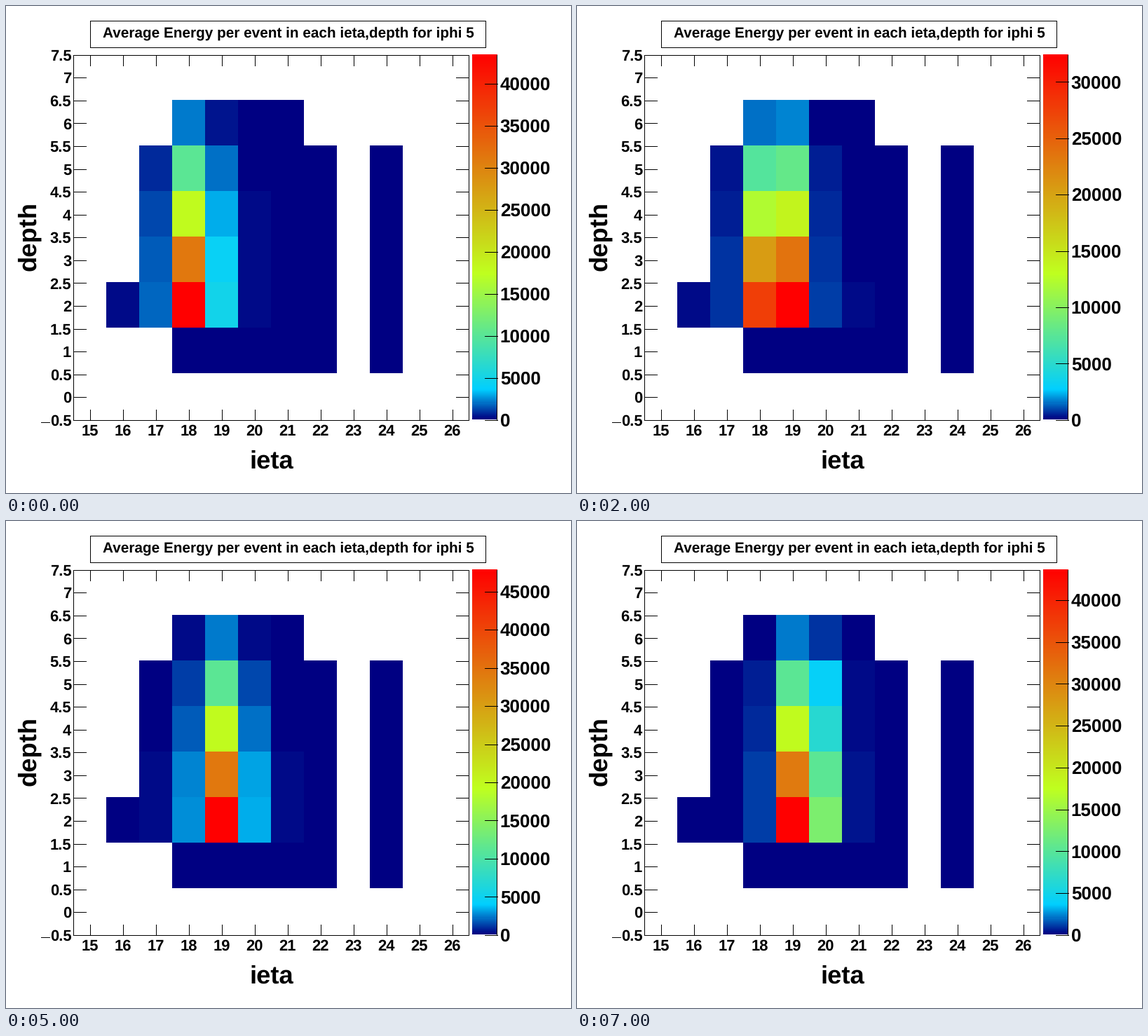
Write a matplotlib script that moves like this. It is 806x695 px and loops after 8 s.

```python
import numpy as np
import matplotlib.pyplot as plt
from matplotlib.animation import FuncAnimation
from matplotlib.colors import LinearSegmentedColormap
from matplotlib.patches import Rectangle

W, H, DPI = 806, 695, 64
PX = 72 / DPI
LEFT, RIGHT, TOP, BOTTOM = 96.5, 660.5, 69.5, 590.5
BAR_L, BAR_R = 665, 701
STEP = 5000
LEVELS = 255
NUDGE = 0.25  # keeps half-pixel coordinates from snapping to the next pixel

IETA = np.arange(15, 27)
DEPTH = np.arange(8)
PROFILE = np.array([0, 0, 1, 0.74, 0.44, 0.26, 0.055, 0])
MAXIMA = [43460, 40430, 32400, 45480, 48300, 47850, 47460, 43600]

plt.rcParams.update({"font.family": "Liberation Sans", "font.weight": "bold",
                     "text.hinting": "none"})

cmap = LinearSegmentedColormap.from_list("energy", [
    (0.00, (0.00, 0.00, 0.51)),
    (0.08, (0.00, 0.81, 1.00)),
    (0.40, (0.75, 1.00, 0.12)),
    (1.00, (1.00, 0.00, 0.00))], N=LEVELS)


def detector():
    """True where a cell exists, indexed by depth and ieta."""
    depth, ieta = np.meshgrid(DEPTH, IETA, indexing="ij")
    low = np.where(ieta < 18, 2, 1)
    high = np.select([ieta == 16, (ieta >= 18) & (ieta <= 21)], [2, 6], 5)
    return ((depth >= low) & (depth <= high)
            & (ieta >= 16) & (ieta <= 24) & (ieta != 23))


def spread(x, width):
    """Share of a two-sided exponential that lies below x."""
    return 0.5 + 0.5 * np.sign(x) * (1 - np.exp(-np.abs(x) / width))


def energy(n):
    """Narrow shower core plus a wide halo around a beam that drifts in ieta."""
    beam = 18.135 + 0.2 * n - 0.0043 * n * n
    edges = np.append(IETA, 27) - 0.5 - beam
    core = 0.2 + 0.03 * (DEPTH[:, None] - 2)
    below = 0.9 * spread(edges, core) + 0.1 * spread(edges, 0.7)
    cells = PROFILE[:, None] * np.diff(below, axis=1)
    return np.ma.masked_where(~exists, cells / cells.max())


exists = detector()
fig = plt.figure(figsize=(W / DPI, H / DPI), dpi=DPI, facecolor="white")
ax = fig.add_axes([0, 0, 1, 1])
ax.axis("off")


def line(xs, ys):
    return ax.plot(xs, ys, color="black", lw=PX, antialiased=False,
                   solid_capstyle="butt", zorder=3)[0]


def text(x, y, s, size, ha="center", va="baseline", **kw):
    return ax.text(x, y, s, fontsize=size * PX, ha=ha, va=va, **kw)


def box(x0, y0, x1, y1):
    ax.add_patch(Rectangle((x0, y0), x1 - x0, y1 - y0, fill=False,
                           ec="black", lw=PX, antialiased=False, zorder=3))


def heat(xs, ys, values):
    return ax.pcolormesh(np.floor(xs), np.floor(ys), values, cmap=cmap,
                         vmin=0, vmax=1, antialiased=False, edgecolors="none")


mesh = heat(np.linspace(LEFT, RIGHT, 13),
            np.linspace(BOTTOM - 0.5, TOP - 0.5, 9), energy(0))
heat([BAR_L, BAR_R], np.linspace(BOTTOM, TOP, LEVELS + 1),
     np.linspace(0, 1, LEVELS)[:, None])

box(LEFT, TOP, RIGHT, BOTTOM)
box(120.5, 20.5, 684.5, 58.5)
text(403, 44.5, "Average Energy per event in each ieta,depth for iphi 5", 20.7)
text(379.5, 659, "ieta", 36.4)
text(50, 328, "depth", 36.4, ha="right", va="center", rotation=90)

for i, ieta in enumerate(IETA):
    x = LEFT + 47 * (i + 0.5)
    line([x, x], [BOTTOM, BOTTOM - 15])
    line([x, x], [TOP, TOP + 15])
    text(x, 612.5, str(ieta), 22)

for i in range(17):
    y = BOTTOM - (BOTTOM - TOP) * i / 16
    line([LEFT, LEFT + 18], [y, y])
    line([RIGHT - 18, RIGHT], [y, y])
    text(93.5, y + 8, f"{abs(i / 2 - 0.5):g}", 22, ha="right")
line([50, 62], [593.5, 593.5])

line([BAR_R - 0.5, BAR_R - 0.5], [TOP, BOTTOM])
bar_ticks = [line([BAR_R - 18, BAR_R], [0, 0]) for _ in range(10)]
bar_labels = [text(705, 0, str(i * STEP), 26, ha="left") for i in range(10)]

ax.set(xlim=(NUDGE, W + NUDGE), ylim=(H - NUDGE, -NUDGE))


def update(n):
    mesh.set_array(energy(n))
    for i, (tick, label) in enumerate(zip(bar_ticks, bar_labels)):
        y = BOTTOM - (BOTTOM - TOP) * i * STEP / MAXIMA[n]
        tick.set_ydata([y, y])
        label.set_y(y + 9)
        for artist in (tick, label):
            artist.set_visible(y >= TOP)
    return [mesh, *bar_ticks, *bar_labels]


anim = FuncAnimation(fig, update, frames=len(MAXIMA), interval=1000,
                     repeat=True, repeat_delay=0, blit=False)
plt.show()
```
